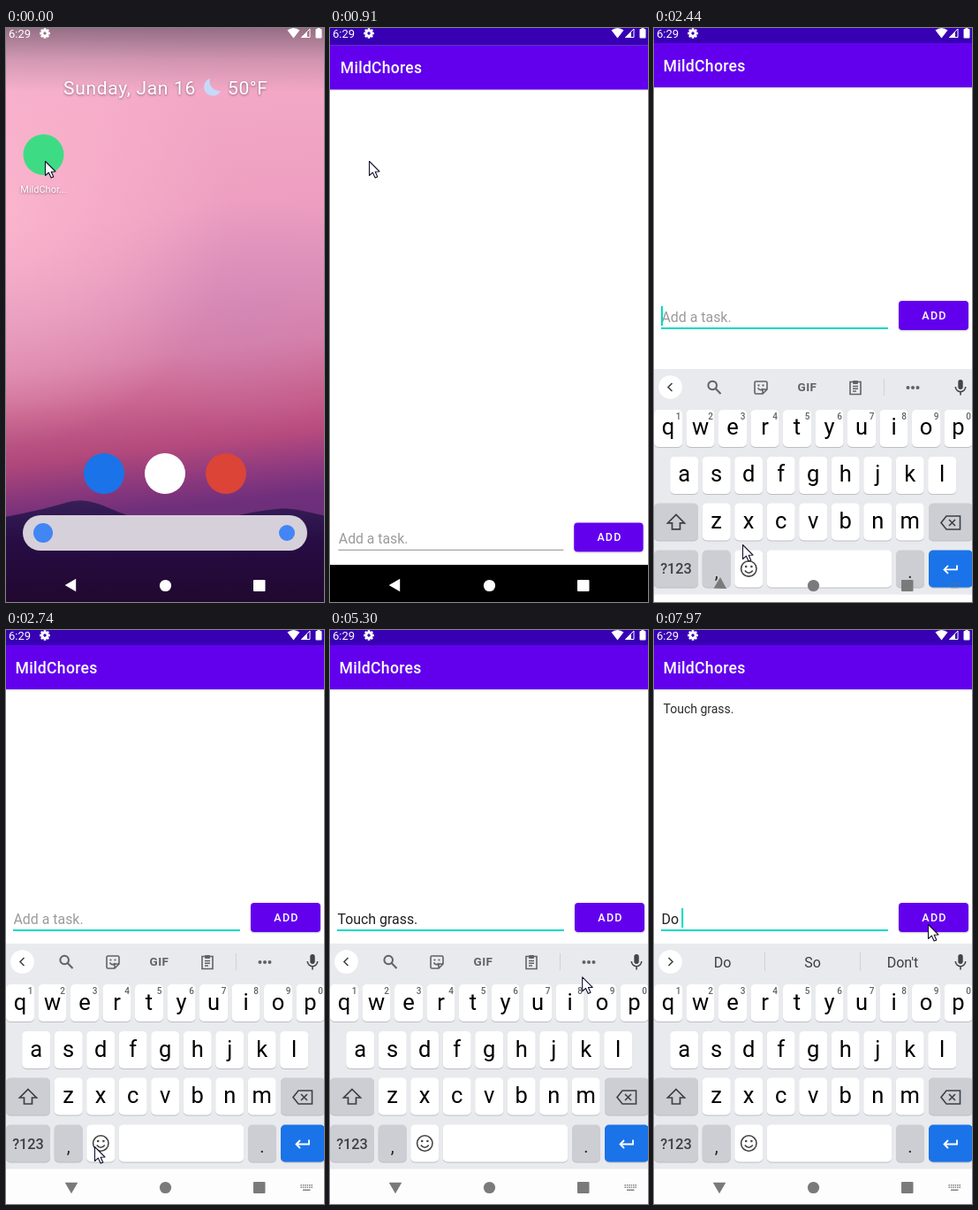
These frames come from a looping animation (360 by 648 pixels, 8000 ms). An HTML page with a canvas:

```html
<!DOCTYPE html>
<html lang="en">
<head>
<meta charset="utf-8">
<title>MildChores</title>
<style>
html, body { margin: 0; width: 100%; height: 100%; overflow: hidden; background: #fff; }
canvas { display: block; width: 360px; height: 648px; }
</style>
</head>
<body>
<canvas id="stage" width="360" height="648"></canvas>
<script>
const c = document.getElementById('stage').getContext('2d');
const LOOP = 8000, TEAL = '#03dac5', GREY = '#5f6368';

const clamp = v => Math.max(0, Math.min(1, v));
const ramp = (t, a, b) => clamp((t - a) / (b - a));
const smooth = p => p * p * (3 - 2 * p);
const out = (p, k) => 1 - (1 - p) ** k;
const mix = (a, b, p) => a + (b - a) * p;

function group(fn, alpha = 1) {
  if (alpha <= 0) return;
  c.save();
  c.globalAlpha *= alpha;
  fn();
  c.restore();
}
function rect(x, y, w, h, fill, r = 0) {
  c.fillStyle = fill;
  c.beginPath();
  c.roundRect(x, y, w, h, r);
  c.fill();
}
function dot(x, y, r, fill) {
  c.fillStyle = fill;
  c.beginPath();
  c.arc(x, y, r, 0, 7);
  c.fill();
}
function poly(points, fill) {
  c.fillStyle = fill;
  c.beginPath();
  points.forEach(p => c.lineTo(...p));
  c.closePath();
  c.fill();
}
function stroke(d, color = GREY, width = 1.6) {
  c.strokeStyle = color;
  c.lineWidth = width;
  c.stroke(new Path2D(d));
}
function text(s, x, y, size, fill, { align = 'left', weight = 400, gap = 0 } = {}) {
  c.font = `${weight} ${size}px Roboto, sans-serif`;
  c.letterSpacing = gap + 'px';
  c.textAlign = align;
  c.fillStyle = fill;
  c.fillText(s, x, y);
  return c.measureText(s).width;
}
function shade(g, stops) {
  stops.forEach(([at, color]) => g.addColorStop(at, color));
  c.fillStyle = g;
  c.fillRect(-30, -30, 420, 710);
}

// Home screen
function wallpaper(zoom) {
  group(() => {
    c.translate(180, 324);
    c.scale(zoom, zoom);
    c.translate(-180, -324);
    shade(c.createLinearGradient(0, 0, 60, 545), [
      [0, '#efafd3'], [.2, '#f3a8c6'], [.42, '#ee9fc1'], [.58, '#de90b8'],
      [.7, '#d680a8'], [.79, '#c9648f'], [.88, '#bd4d82'], [.95, '#963d88'], [1, '#7a3488']]);
    shade(c.createRadialGradient(0, 215, 0, 0, 215, 250),
      [[0, 'rgba(255,188,208,.75)'], [1, 'rgba(255,188,208,0)']]);
    shade(c.createRadialGradient(270, 325, 0, 270, 325, 130),
      [[0, 'rgba(196,128,188,.28)'], [1, 'rgba(196,128,188,0)']]);
    const hill = c.createLinearGradient(0, 522, 0, 648);
    hill.addColorStop(0, '#3c2260');
    hill.addColorStop(.35, '#290d4b');
    hill.addColorStop(1, '#1f062e');
    c.fillStyle = hill;
    c.fill(new Path2D('M-30 545 L0 541 C30 536 60 529 75 524 C88 520 102 522 118 529 C135 536 150 543 170 543 L215 540 C240 545 265 534 300 531 C325 528 340 540 390 543 V700 H-30Z'));
  });
}

function launcher(t, alpha) {
  group(() => {
    shade(c.createLinearGradient(0, 0, 0, 72),
      [[0, 'rgba(45,40,50,.47)'], [.5, 'rgba(45,40,50,.17)'], [1, 'rgba(45,40,50,0)']]);
    shade(c.createLinearGradient(0, 420, 0, 648), [[0, 'rgba(30,10,35,0)'], [1, 'rgba(30,10,35,.25)']]);
    c.translate(0, -35 * out(ramp(t, 430, 830), 1.5));
    c.shadowColor = 'rgba(60,30,60,.55)';
    c.shadowBlur = 3;
    c.shadowOffsetY = 1;
    text('Sunday, Jan 16', 65, 75, 21, '#fff', { gap: .68 });
    text('50°F', 251, 75, 21, '#fff', { gap: .6 });
    text('MildChor...', 42.5, 186, 11, '#fff', { align: 'center' });
    c.shadowColor = 'transparent';
    c.fillStyle = '#c6d9fa';
    c.fill(new Path2D('M231 57 A10 10 0 1 0 243 71 A11 11 0 0 1 231 57Z'));
    group(() => dot(42.5, 143, 23, '#3ddc84'), 1 - ramp(t, 430, 600));
    dot(111, 503, 23, '#1a73e8');
    dot(180, 503, 23, '#fff');
    dot(249, 503, 23, '#db4437');
    rect(19, 550, 322, 40, '#d6d0da', 20);
    dot(42, 570, 11, '#4285f4');
    dot(318, 570, 9, '#4285f4');
  }, alpha);
}

// System bars
function statusBar() {
  text('6:29', 3, 11, 13, '#fff');
  group(() => {
    c.translate(44, 6);
    for (let i = 0; i < 8; i++) {
      c.rotate(Math.PI / 4);
      rect(-1.3, -5.8, 2.6, 4, '#fff');
    }
    c.strokeStyle = '#fff';
    c.lineWidth = 2.6;
    c.beginPath();
    c.arc(0, 0, 3.2, 0, 7);
    c.stroke();
  });
  c.fillStyle = '#fff';
  c.fill(new Path2D('M318.5 2.5 Q325.5 -2.5 332.5 2.5 L325.5 11.5Z'));
  stroke('M334.5 10.5 L344 1 V10.5Z', '#fff', 1);
  poly([[334, 11], [341, 4], [341, 11]], '#fff');
  rect(350.5, 1, 7, 10.5, '#fff', 1);
  rect(352.5, -1, 3, 3, '#fff');
}

function navIcons(p) {
  const v = Math.round(mix(255, 122, clamp(p * 2))), color = `rgb(${v},${v},${v})`;
  group(() => {
    c.translate(74, 629);
    c.rotate(-p * p * Math.PI / 2);
    poly([[-7.3, 0], [5.2, -7.3], [5.2, 7.3]], color);
  });
  dot(180.5, 629.5, 6.6, color);
  rect(280, 623, 13.5, 13, color, 1);
  group(() => {
    for (let y = 0; y < 2; y++)
      for (let x = 0; x < 6; x++) rect(333.5 + x * 2.4, 626 + y * 2.5, 1.4, 1.4, color);
    rect(336, 631.5, 8.5, 1.4, color);
  }, p * p);
}

// Typing
const keyTimes = [3400, 3500, 3610, 3710, 3810, 3900, 4120, 4200, 4270, 4350, 4430, 4590];
const edits = [
  [2240, ''],
  ...keyTimes.map((at, i) => [at, 'Touch grass.'.slice(0, i + 1)]),
  [5960, ''], [7600, 'D'], [7870, 'Do'], [7970, 'Do '],
];
const lastEdit = t => edits.filter(e => e[0] <= t).pop();

function suggestions(t) {
  if (t >= 7700) return ['Do', 'So', "Don't"];
  if (t >= 4120 && t < 4790) return ['grass', 'grassy', 'grasses'];
  if (t >= 3440 && t < 4120) return ['Touch', 'Touching', 'Touched'];
}

function inputRow(t) {
  const focus = t >= 2070, edit = lastEdit(t), value = edit ? edit[1] : '';
  const size = 15.9, x = 8.5;
  const end = x + text(value, x, 331.5, size, '#212121');
  if (!value) text('Add a task.', x, 331.5, size, '#9b9b9b');
  rect(8, focus ? 338 : 338.5, 257, focus ? 2 : 1, focus ? TEAL : '#8c8c8c');
  if (value && !value.endsWith(' ') && (t < 4790 || t >= 7600)) {
    const from = x + c.measureText(value.slice(0, value.indexOf(' ') + 1)).width;
    rect(from, 333, end - from, 1, '#212121');
  }
  if (edit && (t - edit[0]) % 1000 < 500) rect(value ? end - .8 : 8, 314, 2, 22, TEAL);

  group(() => {
    c.shadowColor = 'rgba(0,0,0,.22)';
    c.shadowBlur = 2;
    c.shadowOffsetY = 1;
    rect(277, 308, 79, 33, '#6200ee', 4);
  });
  group(() => {
    c.beginPath();
    c.roundRect(277, 308, 79, 33, 4);
    c.clip();
    dot(310, 332, 65 * out(ramp(t, 5910, 6110), 2), 'rgba(255,255,255,.24)');
  }, t > 5910 ? 1 - ramp(t, 6060, 6240) : 0);
  text('ADD', 317.5, 329, 12.5, '#fff', { align: 'center', weight: 500, gap: 1.2 });
}

function app(t) {
  const scale = 1 - .06 * (1 - ramp(t, 800, 1160)) ** 5.5;
  group(() => {
    rect(0, 0, 360, 648, '#fff');
    c.translate(180, 380);
    c.scale(scale, scale);
    c.translate(-180, -380);
    group(() => {
      c.shadowColor = 'rgba(0,0,0,.15)';
      c.shadowBlur = 2;
      c.shadowOffsetY = 1;
      rect(-20, 17, 400, 50, '#6200ee');
    });
    rect(-20, -40, 400, 57, '#3700b3');
    text('MildChores', 10.5, 48.7, 17.6, '#fff', { weight: 500, gap: .3 });
    group(() => text('Touch grass.', 10.5, 94, 14, '#2b2b2b'), ramp(t, 6050, 6200));
    c.translate(0, t < 2240 ? 252 : 0);
    inputRow(t);
  });
  rect(0, 606, 360, 42, '#000');
}

// Keyboard
function key(x, y, w, label, fill = '#fff') {
  rect(x, y + 1, w, 42, '#bcbfc4', 5);
  rect(x, y, w, 42, fill, 5);
  if (label) text(label, x + w / 2, y + 28.5, 25.5, '#000', { align: 'center' });
}

function toolbar(words) {
  dot(18.5, 374.5, 13.3, '#fff');
  stroke(words ? 'M16.5 370 L21 374.5 L16.5 379' : 'M20.5 370 L16 374.5 L20.5 379', '#444');
  if (words) {
    words.forEach((w, i) => text(w, [77.5, 179.5, 281.5][i], 381, 16, '#3c4043', { align: 'center' }));
    rect(125, 364, 1, 21, '#cfd1d5');
    rect(233, 364, 1, 21, '#cfd1d5');
  } else {
    stroke('M71 372.5 a4.8 4.8 0 1 0 -9.6 0 a4.8 4.8 0 1 0 9.6 0 M69.7 376 L75.5 382', GREY, 2);
    stroke('M115.5 368 H126.5 Q128 368 128 369.5 V377 L123 382 H115.5 Q114 382 114 380.5 V369.5 Q114 368 115.5 368 M128 377 H123 V382 M117.5 375.5 Q120 379.5 123.5 376');
    dot(118.5, 372.5, 1.1, GREY);
    dot(123.5, 372.5, 1.1, GREY);
    text('GIF', 173.5, 379, 13.5, GREY, { align: 'center', weight: 700, gap: .5 });
    stroke('M222 368.5 H234 V382.5 H222Z M225 373.5 H231 M225 376.3 H231 M225 379 H229');
    rect(225, 367, 6, 4, GREY, 1);
    rect(260, 365, 1, 19, '#cfd1d5');
    [287.5, 293, 298.5].forEach(x => dot(x, 375, 2, GREY));
  }
  rect(344.3, 366, 5.4, 11, '#444', 2.7);
  stroke('M341.3 374 a5.7 5.7 0 0 0 11.4 0 M347 380 V383.5', '#444');
}

function keyboard(t, drop) {
  const special = '#ccced3', pitch = 36.5;
  group(() => {
    c.translate(0, drop);
    rect(0, 354, 360, 255, '#e8eaed');
    rect(0, 608.5, 360, 40, '#fdfdfd');
    toolbar(suggestions(t));
    [['qwertyuiop', 0, 400], ['asdfghjkl', 18.2, 453], ['zxcvbnm', 54.7, 505.5]].forEach(([row, x, y]) =>
      [...row].forEach((ch, i) => {
        key(x + i * pitch, y, 32, ch);
        if (y === 400)
          text((i + 1) % 10, 27.5 + i * pitch, 411, 10, GREY, { align: 'center', weight: 500 });
      }));
    key(0, 505.5, 50, '', special);
    stroke('M25 518.5 L34.5 528 H29.5 V535 H20.5 V528 H15.5Z', '#3c4043', 1.7);
    key(311, 505.5, 50, '', special);
    stroke('M331 520 H346.5 V535 H331 L325 527.5Z M334 524 L341 531 M341 524 L334 531', '#3c4043', 1.6);
    key(0, 558.5, 50, '', special);
    text('?123', 25, 585.5, 16.3, '#3c4043', { align: 'center', weight: 500 });
    key(54.7, 558.5, 32, '', special);
    text(',', 70.7, 590, 20, '#222', { align: 'center' });
    key(91.2, 558.5, 32);
    stroke('M116 579.5 a8.7 8.7 0 1 0 -17.4 0 a8.7 8.7 0 1 0 17.4 0 M102.8 581.5 Q107.3 587 111.8 581.5', '#444');
    dot(104.2, 577, 1.3, '#444');
    dot(110.4, 577, 1.3, '#444');
    key(127.7, 558.5, 141.5);
    key(274, 558.5, 32, '', special);
    text('.', 290, 590, 20, '#222', { align: 'center' });
    key(311, 558.5, 50, '', '#1a73e8');
    stroke('M343 575.5 V580.5 H329 M333 576 L328.5 580.5 L333 585', '#fff', 1.8);
  });
}

function pointer(t) {
  const p = smooth(ramp(t, 1190, 1920)), q = ramp(t, 5090, 5600);
  const x = mix(mix(44, 100, p), 310, out(q, 4));
  const y = mix(mix(150, 583, p), 332, out(q, 2.7));
  group(() => {
    c.translate(x + .5, y + .5);
    c.lineJoin = 'round';
    poly([[0, 0], [0, 16], [3.8, 12.6], [6.6, 18.6], [9.3, 17.4], [6.7, 11.7], [11.5, 11.5]], '#fff');
    c.strokeStyle = '#15102e';
    c.lineWidth = 1.1;
    c.stroke();
  });
}

function draw(t) {
  const home = 1 - ramp(t, 430, 840), shown = ramp(t, 810, 900);
  c.clearRect(0, 0, 360, 648);
  if (shown < 1) {
    wallpaper(1 + .058 * (1 - out(ramp(t, 430, 830), 1.5)));
    launcher(t, home);
  }
  if (shown) group(() => app(t), shown);
  const rise = ramp(t, 2260, 2580);
  if (rise) keyboard(t, 294 * (1 - rise) ** 2.7);
  group(() => {
    statusBar();
    navIcons(rise);
  }, Math.max(1 - ramp(t, 430, 760), shown));
  pointer(t);
}

function tick() {
  draw(performance.now() % LOOP);
  requestAnimationFrame(tick);
}
tick();
</script>
</body>
</html>
```
